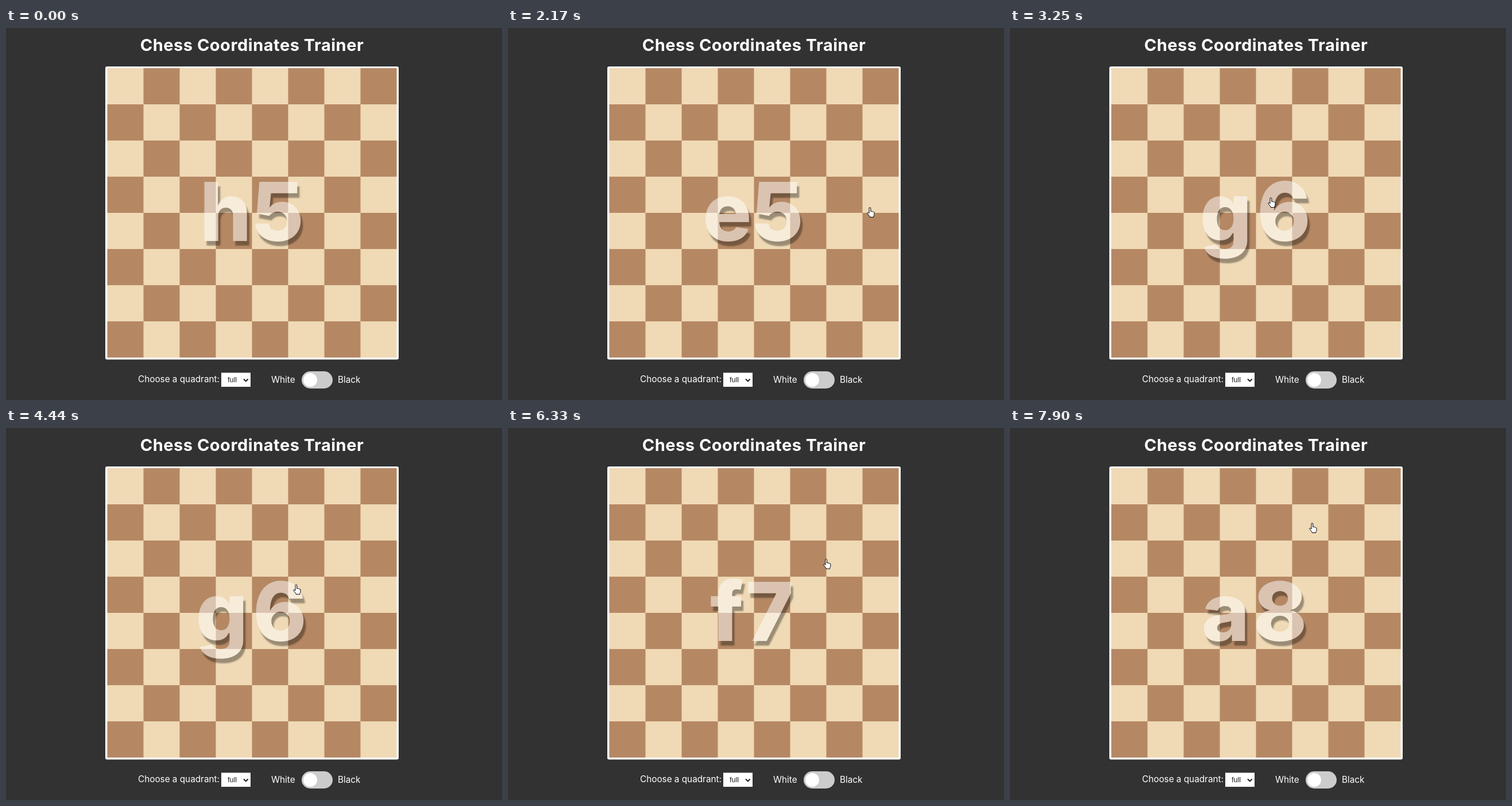
Animation of 864x648 px, one loop 8000 ms. Source, as an HTML page:

```html
<!DOCTYPE html>
<html lang="en">
<head>
<meta charset="utf-8">
<title>Chess Coordinates Trainer</title>
<style>
  html, body { margin: 0; width: 100%; height: 100%; overflow: hidden; background: #323232; }
  svg { display: block; width: 100vw; height: 100vh; }
  text { font-family: Inter, "Open Sans", sans-serif; fill: #fff; }
  .title { font-size: 29px; font-weight: 700; letter-spacing: .5px; text-anchor: middle; }
  .caption { font-size: 15.3px; }
  .option { font: 12.5px "Liberation Sans", sans-serif; fill: #222; }
  #label { font-size: 44px; font-weight: 300; fill: #0c0c0c; text-anchor: middle; }
  #prompt { opacity: .5; filter: drop-shadow(4px 8px 1.2px rgba(0, 0, 0, .7)); }
  #prompt text { font-size: 142px; font-weight: 800; text-anchor: middle; fill: inherit; }
</style>
</head>
<body>
<svg viewBox="0 0 864 648">
  <rect width="864" height="648" fill="#323232"/>
  <text class="title" x="428.5" y="40">Chess Coordinates Trainer</text>
  <rect x="173" y="67" width="511" height="510.5" rx="3" fill="#fff"/>
  <rect x="176.5" y="70" width="504" height="504" fill="#f0d9b5"/>
  <path id="squares" fill="#b58863"/>
  <text id="label"></text>
  <g id="prompt"><text id="file" y="371"></text><text id="rank" y="371"></text></g>

  <text class="caption" x="230" y="616.5">Choose a quadrant:</text>
  <rect x="375" y="600.5" width="51" height="24.5" fill="#fff"/>
  <text class="option" x="386" y="617">full</text>
  <path d="M414 611.5l3.8 3.8 3.8-3.8" fill="none" stroke="#222" stroke-width="2"/>
  <text class="caption" x="462" y="618">White</text>
  <rect x="515" y="598" width="54" height="30" rx="15" fill="#ccc"/>
  <circle cx="530" cy="613" r="12" fill="#fff"/>
  <text class="caption" x="578" y="618">Black</text>

  <g id="cursor" fill="#fff" stroke="#000" stroke-linejoin="round">
    <path id="hand" d="M4 11V2a1.4 1.4 0 0 1 2.8 0V7.5q1.5-1 2.5.3q1.5-.6 2.1.6q1.6-.3 1.6 1.2V13q0 1.5-1.2 3V17.5H5.2V16.4L1 11.2q-.9-1.5.6-1.9q1.2 0 2.4 1.7"/>
    <path id="arrow" d="M.5.5V16l3.6-3.4 2.5 5.6 2.3-1-2.5-5.4h5z"/>
  </g>
</svg>
<script>
const LOOP = 8000, CELL = 63, LEFT = 176.5, TOP = 70;
const WHITE = '#fff', GREEN = '#63f465', RED = '#e66868';
const byId = id => document.getElementById(id);

// start time, square, centres of the two glyphs
const prompts = [
  [0, 'h5', 382.5, 474],
  [1390, 'e5', 382, 470],
  [3250, 'g6', 376, 477],
  [5220, 'f7', 381, 455.5],
  [7900, 'a8', 375.5, 470.5]
];

const tints = [
  [0, WHITE], [1070, GREEN], [1390, WHITE], [2890, GREEN], [3250, WHITE],
  [4840, GREEN], [5220, WHITE], [6890, RED], [7520, GREEN], [7900, WHITE]
];

const labels = [
  [0, ''], [1070, 'h5'], [1390, ''], [2890, 'e5'], [3250, ''], [4840, 'g6'],
  [5220, ''], [6890, 'e7'], [7120, ''], [7520, 'f7'], [7900, '']
];

// first step, last step, number of steps, path
const moves = [
  [300, 990, 10, [[850, 700], [683, 560], [577, 476], [612, 385], [643, 301]]],
  [2080, 2800, 10, [[643, 301], [625, 312], [570, 312], [500, 290], [445, 286], [449, 295]]],
  [3960, 4760, 11, [[449, 295], [457, 295], [482, 281], [515, 265], [574, 234]]],
  [6330, 6810, 7, [[574, 234], [530, 223], [500, 195], [472, 170], [465, 160]]],
  [7120, 7370, 4, [[465, 160], [485, 165], [521, 165]]]
];

const current = (list, t) => list.filter(item => item[0] <= t).pop();

function along(points, u) {
  const s = u * (points.length - 1);
  const i = Math.min(Math.floor(s), points.length - 2);
  return [0, 1].map(k => points[i][k] + (points[i + 1][k] - points[i][k]) * (s - i));
}

function cursorAt(t) {
  const move = current(moves, t);
  if (!move) return null;
  const [start, end, steps, points] = move;
  const step = Math.floor((t - start) / (end - start) * (steps - 1) + 1e-6) + 1;
  return along(points, Math.min(step, steps) / steps);
}

function drawCursor(t) {
  const pos = cursorAt(t);
  byId('cursor').style.display = pos ? '' : 'none';
  if (!pos) return;
  const [x, y] = pos;
  const onBoard = x > LEFT && x < LEFT + 8 * CELL && y > TOP && y < TOP + 8 * CELL;
  byId('cursor').setAttribute('transform', `translate(${x} ${y})`);
  byId('hand').style.display = onBoard ? '' : 'none';
  byId('arrow').style.display = onBoard ? 'none' : '';
}

function drawLabel(t) {
  const square = current(labels, t)[1], label = byId('label');
  label.textContent = square;
  if (!square) return;
  label.setAttribute('x', LEFT + CELL * ('abcdefgh'.indexOf(square[0]) + .5));
  label.setAttribute('y', TOP + CELL * (8 - square[1]) + 47.5);
}

function drawPrompt(t) {
  const [, square, ...centres] = current(prompts, t);
  ['file', 'rank'].forEach((id, i) => {
    byId(id).textContent = square[i];
    byId(id).setAttribute('x', centres[i]);
  });
  byId('prompt').style.fill = current(tints, t)[1];
}

function render(t) {
  drawPrompt(t);
  drawLabel(t);
  drawCursor(t);
}

let board = '';
for (let row = 0; row < 8; row++)
  for (let col = 1 - row % 2; col < 8; col += 2)
    board += `M${LEFT + col * CELL} ${TOP + row * CELL}h${CELL}v${CELL}h-${CELL}z`;
byId('squares').setAttribute('d', board);

const origin = performance.now();
function tick() {
  render((performance.now() - origin) % LOOP);
  requestAnimationFrame(tick);
}
tick();
</script>
</body>
</html>
```
